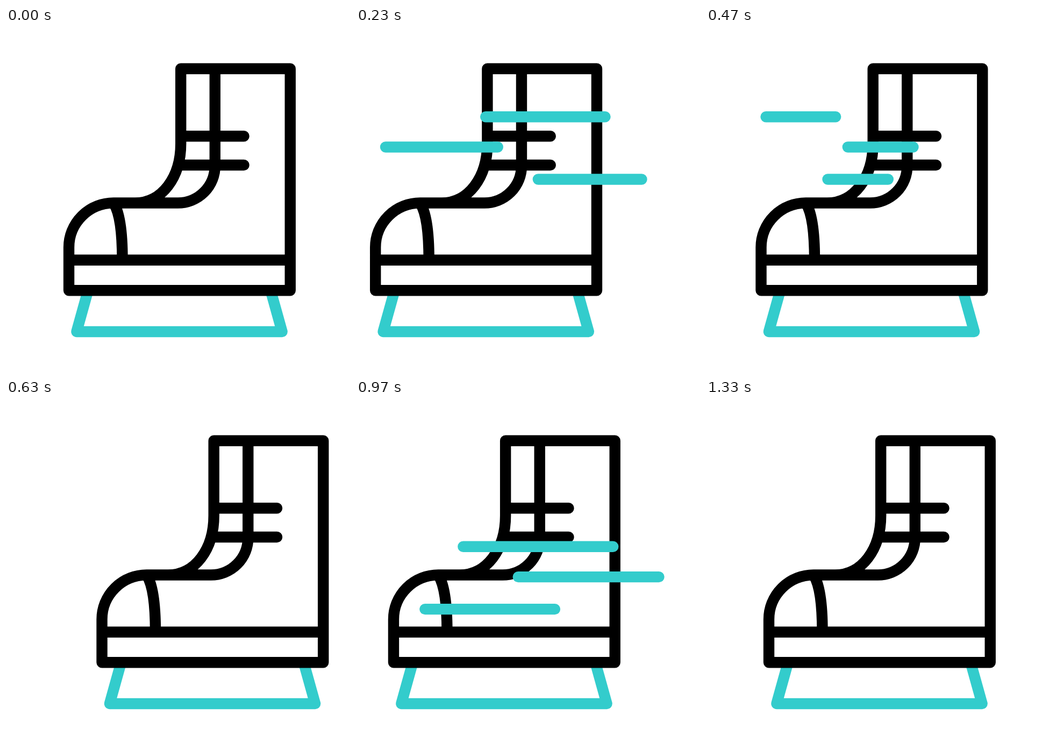
These frames come from a looping animation (640 by 640 pixels, 1670 ms). An HTML page with a canvas:

```html
<!DOCTYPE html>
<html lang="en">
<head>
<meta charset="utf-8">
<title>Skating boot</title>
<style>
  html, body { margin: 0; width: 100%; height: 100%; overflow: hidden; background: #fff; }
  canvas { display: block; }
</style>
</head>
<body>
<canvas id="stage" width="640" height="640"></canvas>
<script>
const ctx = document.getElementById('stage').getContext('2d');
const LOOP = 1670, FPS = 30, TEAL = '#33cccc';

const blade = new Path2D('M152.7 488.3 L131.3 565 H513.7 L492.3 488.3');
const boot = new Path2D(
  'M325.2 75.8 H528.8 V488.3 H117 V408 A83 82.5 0 0 1 200 325.5 H240' +
  'C290 325.5 325.2 278 325.2 215 Z' +
  'M388.8 75.8 V256.5 A69 69 0 0 1 319.8 325.5 H200' +
  'C211 342 216.5 380 216.5 431.8 M117 431.8 H528.8' +
  'M325.2 201.3 H442.6 M322 255 H442.6');

// Boot offset keys: [frame, x]
const slide = [[0, 0], [9, -90.5], [19, 61.5], [22, 61.5], [29.84, -49.8], [40, 0]];

// Wind streaks: [y, from x, to x]
const streaks = [[165.2, 463.5, 111.5], [221.5, 55, 385.5], [281.5, 531.5, 226.5]];

// Each gust trims the streaks; the second one is mirrored and lower.
const gusts = [
  { head: [0, 12], tail: [7, 19], dy: 0, place: x => x },
  { head: [22, 31.33], tail: [26.8, 40], dy: 107.6, place: x => 640 - x }
];

// Symmetric cubic-bezier(p, 0, 1 - p, 1)
function ease(x, p) {
  if (x <= 0) return 0;
  if (x >= 1) return 1;
  let lo = 0, hi = 1, s;
  for (let i = 0; i < 24; i++) {
    s = (lo + hi) / 2;
    const bx = 3 * s * (1 - s) * ((1 - s) * p + s * (1 - p)) + s ** 3;
    if (bx < x) lo = s; else hi = s;
  }
  return s * s * (3 - 2 * s);
}

const progress = (frame, [start, end], p) => ease((frame - start) / (end - start), p);

function bootOffset(frame) {
  let x = slide[0][1];
  for (let i = 1; i < slide.length; i++) {
    const [t0, x0] = slide[i - 1], [t1, x1] = slide[i];
    x += (x1 - x0) * progress(frame, [t0, t1], 0.4);
  }
  return x;
}

function strokePath(path, color) {
  ctx.strokeStyle = color;
  ctx.stroke(path);
}

function drawStreaks(frame, { head, tail, dy, place }) {
  const a = progress(frame, tail, 0.375), b = progress(frame, head, 0.375);
  if (b <= a) return;
  for (const [y, from, to] of streaks) {
    const at = k => place(from + (to - from) * k);
    const line = new Path2D();
    line.moveTo(at(a), y + dy);
    line.lineTo(at(b), y + dy);
    strokePath(line, TEAL);
  }
}

function draw(now) {
  const frame = Math.floor((now % LOOP) * FPS / 1000 + 0.101);
  ctx.fillStyle = '#fff';
  ctx.fillRect(0, 0, 640, 640);
  ctx.lineWidth = 20.4;
  ctx.lineCap = ctx.lineJoin = 'round';
  ctx.save();
  ctx.translate(bootOffset(frame), 0);
  strokePath(blade, TEAL);
  strokePath(boot, '#000');
  ctx.restore();
  gusts.forEach(gust => drawStreaks(frame, gust));
}

const begin = performance.now();
function tick() {
  draw(performance.now() - begin);
  requestAnimationFrame(tick);
}
tick();
</script>
</body>
</html>
```
